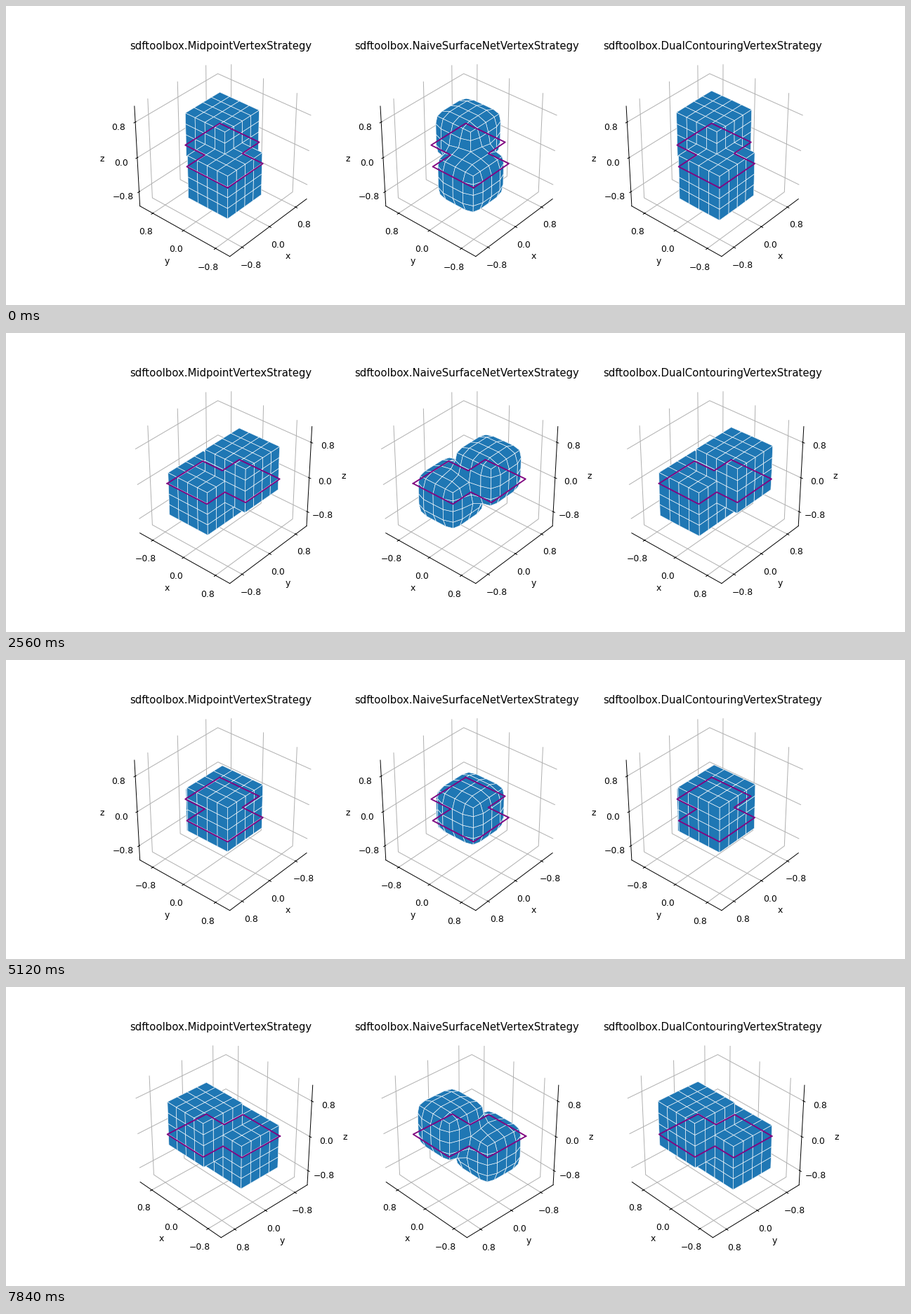
These frames come from a looping animation (1280x427 px, 8 s). A matplotlib script:

```python
"""Three dual isosurface vertex strategies compared on a turning union of boxes."""
from itertools import product

import matplotlib.pyplot as plt
import numpy as np
from matplotlib.animation import FuncAnimation
from mpl_toolkits.mplot3d.art3d import Poly3DCollection

W, H, DPI = 1280, 427, 800 / 9
FRAMES, INTERVAL = 50, 160
AZIM, ELEV, STEP = -139, 35, 360 / 64
EXTENT, RES = 1.1, 10
HALF, SHIFT = 0.5, 0.25


def box(p, center):
    q = np.abs(p - center) - HALF
    outside = np.linalg.norm(np.maximum(q, 0), axis=-1)
    return outside + np.minimum(q.max(axis=-1), 0)


def sdf(p):
    return np.minimum(box(p, -SHIFT), box(p, SHIFT))


def normal(p, eps=1e-4):
    d = eps * np.eye(3)
    n = sdf(p + d) - sdf(p - d)
    return n / np.linalg.norm(n)


def midpoint(cell, points):
    return -EXTENT + (np.array(cell) + 0.5) * 2 * EXTENT / (RES - 1)


def surface_net(cell, points):
    return np.mean(points, axis=0)


def dual_contour(cell, points, bias=1e-2):
    """Least-squares meeting point of the tangent planes, drawn to the mean."""
    mean = np.mean(points, axis=0)
    normals = np.array([normal(p) for p in points])
    dist = np.sum(normals * (points - mean), axis=1)
    a = np.vstack([normals, bias * np.eye(3)])
    b = np.append(dist, np.zeros(3))
    return mean + np.linalg.lstsq(a, b, rcond=None)[0]


def crossings():
    """Surface points per cell, and the four cells around each crossed edge."""
    line = np.linspace(-EXTENT, EXTENT, RES)
    nodes = np.stack(np.meshgrid(line, line, line, indexing="ij"), axis=-1)
    values = sdf(nodes)
    cells, quads = {}, []
    for axis in range(3):
        step = np.eye(3, dtype=int)
        u, v = step[(axis + 1) % 3], step[(axis + 2) % 3]
        for i in product(range(RES - 1), repeat=3):
            j = tuple(np.array(i) + step[axis])
            s, t = values[i], values[j]
            if (s < 0) == (t < 0):
                continue
            point = nodes[i] + s / (s - t) * (nodes[j] - nodes[i])
            quad = [tuple(i - k) for k in (0 * u, u, u + v, v)]
            quads.append(quad)
            for cell in quad:
                cells.setdefault(cell, []).append(point)
    return cells, quads


def outline():
    """Closed cut of the union at z = 0."""
    lo, hi = SHIFT - HALF, SHIFT + HALF
    x = [-hi, -lo, -lo, hi, hi, lo, lo, -hi, -hi]
    y = [-hi, -hi, lo, lo, hi, hi, -lo, -lo, -hi]
    return x, y


def setup_axes(ax, title):
    # Axis planes sit 1/48 of the range outside the grid on each side.
    lim = EXTENT * 25 / 24
    ax.set(xlim=(-lim, lim), ylim=(-lim, lim), zlim=(-lim, lim),
           xlabel="x", ylabel="y", zlabel="z", title=title)
    ax.set_box_aspect((1, 1, 1))
    for axis in (ax.xaxis, ax.yaxis, ax.zaxis):
        axis.set_ticks([-0.8, 0, 0.8])
        axis.set_pane_color((1, 1, 1, 0))


STRATEGIES = {
    "MidpointVertexStrategy": midpoint,
    "NaiveSurfaceNetVertexStrategy": surface_net,
    "DualContouringVertexStrategy": dual_contour,
}

fig = plt.figure(figsize=((W + 1e-6) / DPI, (H + 1e-6) / DPI), dpi=DPI)
cells, quads = crossings()
axes = []
for col, (name, place) in enumerate(STRATEGIES.items(), 1):
    ax = fig.add_subplot(1, 3, col, projection="3d")
    setup_axes(ax, "sdftoolbox." + name)
    verts = {cell: place(cell, np.array(pts)) for cell, pts in cells.items()}
    faces = [[verts[cell] for cell in quad] for quad in quads]
    ax.add_collection3d(Poly3DCollection(
        faces, facecolors="tab:blue", edgecolors="w", linewidths=0.5))
    ax.plot(*outline(), 0, color="purple", lw=1.5, zorder=10)
    axes.append(ax)


def update(frame):
    for ax in axes:
        ax.view_init(elev=ELEV, azim=AZIM + STEP * frame)
    return []


anim = FuncAnimation(fig, update, frames=FRAMES, interval=INTERVAL,
                     init_func=lambda: update(0), repeat=True, blit=False)
plt.show()
```
